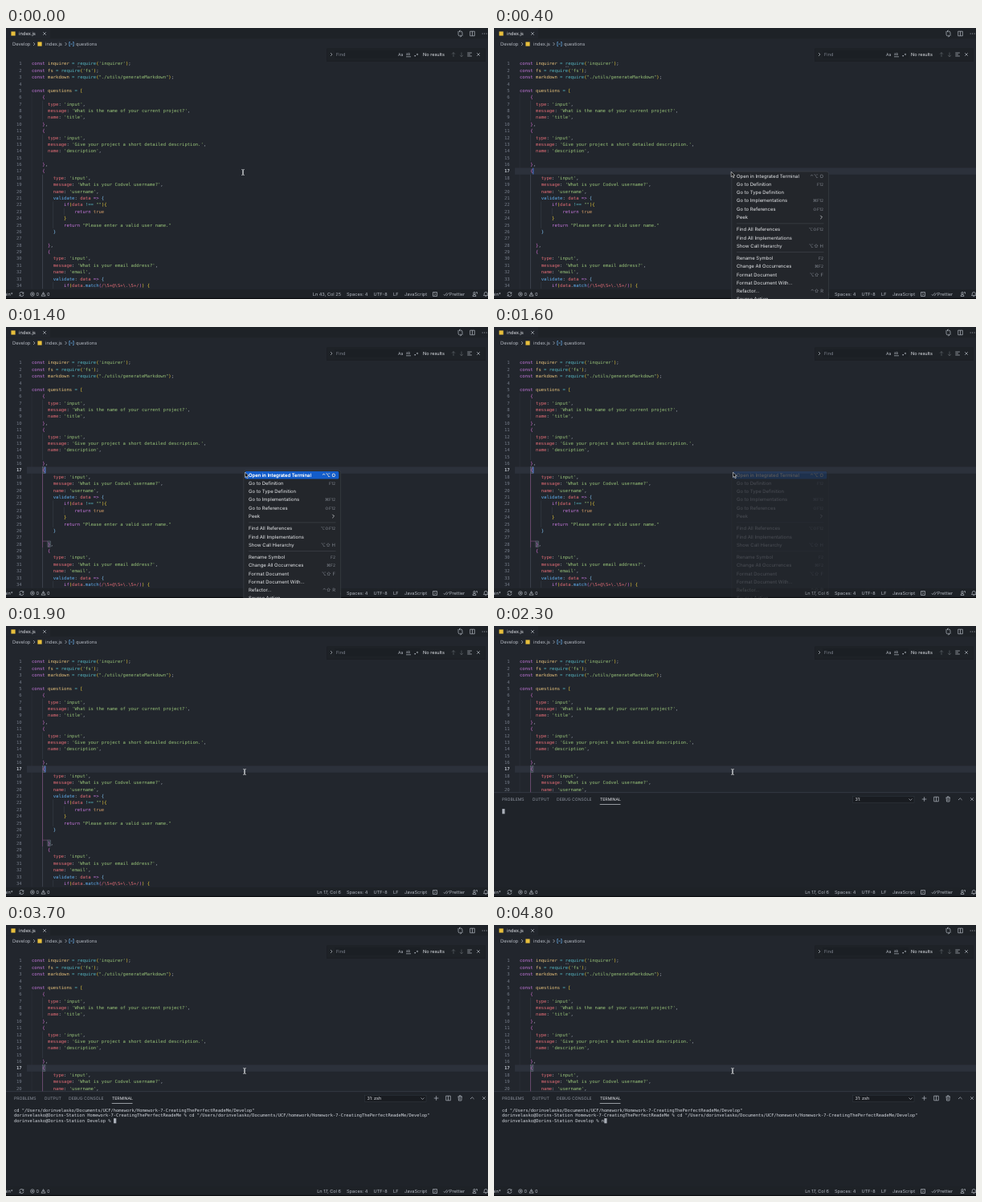
An HTML page for the animation above (5 s loop, 600 by 338 pixels).

```html
<!DOCTYPE html>
<html lang="en">
<head>
<meta charset="utf-8">
<title>Editor and terminal</title>
<style>
  html, body { margin: 0; width: 100%; height: 100%; overflow: hidden; background: #22262d; }
  svg { display: block; width: 600px; height: 338px; }
  text { white-space: pre; text-rendering: geometricPrecision; font-family: Inter, "DejaVu Sans", sans-serif; }
  .mono { font-family: "DejaVu Sans Mono", monospace; }
  .icon { fill: none; stroke: #b4b9c2; stroke-width: .7; }
</style>
</head>
<body>
<svg id="stage" viewBox="0 0 600 338"></svg>
<script>
const LOOP = 5000, STEP = 100;
const CODE_SIZE = 5.563, CHAR = CODE_SIZE * .602, CODE_X = 32, ROW = 8.38;
const rowY = n => 44.5 + (n - 1) * ROW;
const colX = n => CODE_X + n * CHAR;

const text = (x, y, s, size = 5.6, fill = '#b4b9c2', extra = '') =>
  `<text x="${x}" y="${y}" font-size="${size}" fill="${fill}" ${extra}>${s}</text>`;
const mono = (x, y, s, size, fill, extra = '') => text(x, y, s, size, fill, 'class="mono" ' + extra);
const rect = (x, y, w, h, fill, extra = '') =>
  `<rect x="${x}" y="${y}" width="${w}" height="${h}" fill="${fill}" ${extra}/>`;
const icon = (d, extra = '') => `<path class="icon" d="${d}" ${extra}/>`;
const cross = (x, y, r = 1.8) => icon(`M${x - r} ${y - r}l${2 * r} ${2 * r}m0 ${-2 * r}l${-2 * r} ${2 * r}`);
const split = (x, y) => icon(`M${x - 2.8} ${y - 2.8}h5.6v5.6h-5.6zm2.8 0v5.6`);
const chevron = (x, y) => icon(`M${x - 1} ${y - 2}l2 2l-2 2`);
const during = (from, to, body) => `<g data-from="${from}" data-to="${to}">${body}</g>`;

const code = String.raw`const inquirer = require('inquirer');
const fs = require('fs');
const markdown = require("./utils/generateMarkdown");

const questions = [
    {
      type: 'input',
      message: 'What is the name of your current project?',
      name: 'title',
    },
    {
      type: 'input',
      message: 'Give your project a short detailed description.',
      name: 'description',

    },
    {
        type: 'input',
        message: 'What is your Codvel username?',
        name: 'username',
        validate: data => {
            if(data !== ""){
                return true
            }
            return "Please enter a valid user name."
        }

      },
      {
        type: 'input',
        message: 'What is your email address?',
        name: 'email',
        validate: data => {
            if(data.match(/\S+@\S+\.\S+/)) {`.split('\n');

const tokenColors = [
  [/'[^']*'|"[^"]*"/, '#98c379'],
  [/\/\\S.*\//, '#e06c75'],
  [/\b(?:const|if|return)\b|=>/, '#c678dd'],
  [/\btrue\b/, '#d19a66'],
  [/\brequire\b|!==|=/, '#56b6c2'],
  [/\b(?:validate|match)\b/, '#61afef'],
  [/\b(?:type|message|name|data)\b/, '#e06c75'],
  [/\b(?:inquirer|fs|markdown|questions)\b/, '#e5c07b'],
  [/[\[{(\]})]/, null],
];
const tokenPattern = new RegExp(tokenColors.map(([r]) => `(${r.source})`).join('|'), 'g');
const bracketColors = ['#f0cf3c', '#d070d0', '#80c4f4'];
let depth = 0;

function highlight(line) {
  return line.replace(tokenPattern, (token, ...groups) => {
    let color = tokenColors[groups.findIndex(g => g === token)][1];
    if (!color) color = bracketColors[('[{('.includes(token) ? depth++ : --depth) % 3];
    return `<tspan fill="${color}">${token}</tspan>`;
  });
}

function guide(col, first, last, color = '#3a3f49') {
  return rect(colX(col) - .3, rowY(first) - ROW / 2, .6, (last - first + 1) * ROW, color);
}

function editor() {
  const y = rowY(17);
  const box = col => (n => rect(colX(col) - .2, rowY(n) - 3.8, CHAR + .4, 7.6, '#515a6b', 'fill-opacity=".5" stroke="#7b8290" stroke-width=".4"'));
  return during(300, LOOP, rect(26, y - 4.2, 574, ROW, '#2c313b')) +
    guide(0, 6, 34, '#2e333c') + guide(4, 7, 9) + guide(4, 12, 15) + guide(4, 18, 34, '#4d5360') +
    guide(8, 22, 25) + guide(8, 34, 34) + guide(12, 23, 23) +
    during(700, LOOP, guide(4, 18, 28, '#865084') +
      rect(colX(4), rowY(28) - 4, CHAR * 2, .6, '#865084') + box(4)(17) + box(6)(28)) +
    code.map((line, i) => {
      const base = rowY(i + 1) + 1.9;
      return mono(19.7, base, i + 1, CODE_SIZE, '#737a87', 'text-anchor="end"') +
        mono(CODE_X, base, highlight(line), CODE_SIZE, '#abb2bf');
    }).join('') +
    during(300, LOOP, mono(19.7, y + 1.9, 17, CODE_SIZE, '#d5d9e0', 'text-anchor="end"')) +
    during(300, 2000, rect(colX(5) - .3, y - 3.9, .8, 7.8, '#528bff')) +
    [0, 1.6, 3.2].map(d => rect(89 + d, 47.8, .7, .7, '#a5abb5')).join('');
}

function header() {
  const file = (x, y) => rect(x - 2.6, y - 2.6, 5.2, 5.2, '#e8bf3c');
  return rect(0, 0, 600, 13.3, '#1e2227') + rect(0, 0, 55, 13.3, '#22262d') +
    file(9, 7) + text(16, 9, 'index.js', 5.8, '#dfe2e7') + cross(48, 7) +
    icon('M563 4v4q0 2 2 2h2m-1.3-1.3l1.3 1.3l-1.3 1.3M568 10v-4q0-2-2-2h-2m1.3-1.3l-1.3 1.3l1.3 1.3') +
    split(580.5, 7) + [592.7, 595.2, 597.7].map(x => rect(x, 6.6, .9, .9, '#c4c8cf')).join('') +
    text(8, 22, 'Develop', 5.8) + chevron(35, 20) + file(42, 20) + text(49, 22, 'index.js', 5.8) +
    chevron(74.5, 20) + icon('M80 17.5h-1.2v5h1.2M83 17.5h1.2v5h-1.2M80.2 20h2.6', 'style="stroke:#6cb2ec"') +
    text(87, 22, 'questions', 5.7);
}

function findBar() {
  return rect(399, 25.5, 198, 16.5, '#14171b', 'opacity=".45"') +
    rect(400, 25, 196.5, 15.8, '#1e2227') + chevron(405, 33) +
    rect(409, 28, 107, 10, '#1b1f24') + text(411, 35.1, 'Find', 5.6, '#7b818c') +
    text(488, 34.9, 'Aa', 5.2) + text(498, 34.2, 'ab', 4.6) + icon('M498 35.8h6') +
    rect(508.5, 34, 1.4, 1.4, '#b4b9c2') + text(510.5, 35.8, '*', 6) +
    text(519, 35.1, 'No results', 5.6, '#e0e3e8') +
    icon('M557 36v-5.4m-2 2l2-2l2 2M567 30.4v5.4m-2-2l2 2l2-2', 'opacity=".4"') +
    icon('M574.3 31h5.6m-5.6 2h3.6m-3.6 2h5.6') + cross(588, 33);
}

function panel() {
  const path = '"/Users/dorinvelasko/Documents/UCF/homework/Homework-7-CreatingThePerfectReadeMe/Develop"';
  const user = 'dorinvelasko@Dorins-Station ';
  const size = 5.412, cell = size * .602;
  const line = (n, s) => mono(10, 232.8 + n * 6.5, s, size, '#d3d7de');
  const block = (chars, n) => rect(10.2 + chars * cell, 228.1 + n * 6.5, cell, 6.2, '#a9aeb7');
  const prompt = user + 'Develop % ';
  const end = prompt.length;
  return rect(0, 207.6, 600, 118.4, '#1f2329') + rect(0, 207.4, 600, .7, '#3b414c') +
    [[10, 'PROBLEMS'], [47.5, 'OUTPUT'], [78, 'DEBUG CONSOLE'], [132, 'TERMINAL']].map(([x, s]) =>
      text(x, 218.3, s, 5.1, s === 'TERMINAL' ? '#e6e8ec' : '#8d939e')).join('') +
    rect(131.7, 222, 25.8, .7, '#c9cdd4') +
    rect(446.5, 212.2, 76.5, 8, '#191c21', 'stroke="#343a44" stroke-width=".5"') +
    during(2000, 2800, text(449.5, 218.2, '31:', 5.4, '#e0e3e8')) +
    during(2800, LOOP, text(449.5, 218.2, '31: zsh', 5.4, '#e0e3e8')) +
    icon('M516.5 215.5l2 2l2-2M532.8 216h5.6m-2.8-2.8v5.6') + split(550.5, 216) +
    icon('M562.5 214h5.4m-3.6 0v-1.2h1.8v1.2m-3 0l.4 5h3.4l.4-5m-2.3 1v3') +
    icon('M578 217l2.3-2.2l2.3 2.2') + cross(595, 216) +
    during(2000, 3200, block(0, 0)) +
    during(3200, LOOP, line(0, 'cd ' + path)) +
    during(3200, 3400, block(0, 1)) +
    during(3400, LOOP, line(1, user + 'Homework-7-CreatingThePerfectReadeMe % cd ' + path) + line(2, prompt)) +
    during(3400, 4600, block(end, 2)) +
    during(4600, LOOP, line(2, ' '.repeat(end) + 'n') + block(end + 1, 2));
}

function statusBar() {
  const position = s => text(417, 333.9, s, 5.6, '#b4b9c2', 'text-anchor="end"');
  return rect(0, 326, 600, 12, '#1e2227') + rect(0, 336.8, 600, 1.2, '#0b0c0f') +
    text(8.5, 333.9, 'main*', 5.6, '#b4b9c2', 'text-anchor="end"') +
    icon('M16.8 331.5a2.5 2.5 0 0 1 4.8-.6m.2-1.5v1.8h-1.8M22 332.5a2.5 2.5 0 0 1-4.8.6m-.2 1.5v-1.8h1.8') +
    icon('M30.6 332a2.3 2.3 0 1 0 4.6 0a2.3 2.3 0 1 0-4.6 0M32 331l1.8 1.8m0-1.8l-1.8 1.8') +
    text(37.5, 333.9, '0') + icon('M44 334.2l2.5-4.6l2.5 4.6zm2.5-3v1.6') + text(51, 333.9, '0') +
    during(0, 300, position('Ln 43, Col 25')) + during(300, LOOP, position('Ln 17, Col 6')) +
    [[424, 'Spaces: 4'], [457.5, 'UTF-8'], [482, 'LF'], [496, 'JavaScript'], [552, 'Prettier']]
      .map(([x, s]) => text(x, 333.9, s)).join('') +
    icon('M531.5 329.5h5v5h-5zm1.7 1.2l1.6 1.3l-1.6 1.3') +
    icon('M544.8 332.2l1.4 1.5l2.6-3.4m-.8 3l.6.5l2.6-3.4') +
    icon('M581 334.5q0-2.3 2-2.3t2 2.3zm.7-3.8a1.3 1.3 0 1 0 2.6 0a1.3 1.3 0 1 0-2.6 0M585 329.6h1.5v2') +
    icon('M594.5 333.6l.8-1.2v-1a2 2 0 0 1 4 0v1l.8 1.2zm2 1h1.6');
}

function menu() {
  const groups = [
    [184.6, 'Open in Integrated Terminal|⌃⌥ O', 'Go to Definition|F12', 'Go to Type Definition|',
      'Go to Implementations|⌘F12', 'Go to References|⇧F12', 'Peek|'],
    [251.2, 'Find All References|⌥⇧F12', 'Find All Implementations|', 'Show Call Hierarchy|⌥⇧ H'],
    [287, 'Rename Symbol|F2', 'Change All Occurrences|⌘F2', 'Format Document|⌥⇧ F',
      'Format Document With...|', 'Refactor...|⌃⇧ R', 'Source Action...|'],
  ];
  const item = (y, label, keys, on) => text(302, y + 2.1, label, 5.95, on ? '#fff' : '#e4e6e9') +
    text(410, y + 2, keys, keys.includes('F') && !keys.includes(' ') ? 5 : 5.9, on ? '#fff' : '#7e838c', 'text-anchor="end"');
  return `<g id="menu">` +
    rect(295.8, 179, 120.8, 166, '#23262b', 'rx="2.5" stroke="#41454c" stroke-width=".6"') +
    during(900, 1800, rect(297.5, 179.9, 116.8, 9.6, '#135dcb', 'rx="1.5"')) +
    groups.map(([top, ...items]) => items.map((s, i) => item(top + i * 10.25, ...s.split('|'))).join('')).join('') +
    during(900, 1800, item(184.6, 'Open in Integrated Terminal', '⌃⌥ O', true)) +
    [243.6, 279.3].map(y => rect(302, y, 108.5, .6, '#42464d')).join('') +
    icon('M406.3 233.8l2.2 2.2l-2.2 2.2', 'style="stroke:#e4e6e9"') + '</g>';
}

const beam = (x, y) => `<path d="M${x - 1.7} ${y - 3.5}q1.7 0 1.7 1v5q0 1-1.7 1M${x + 1.7} ${y - 3.5}q-1.7 0-1.7 1v5q0 1 1.7 1" fill="none" stroke="#e3e5e8" stroke-width=".8"/>`;
const arrow = (x, y) => `<path d="M${x} ${y}v6.4l1.5-1.4l1.1 2.5l1.1-.5l-1.1-2.4h2z" fill="#08090a" stroke="#f0f0f0" stroke-width=".6"/>`;

const stage = document.getElementById('stage');
stage.innerHTML = rect(0, 0, 600, 338, '#22262d') + editor() + header() + findBar() +
  during(2000, LOOP, panel()) + statusBar() + menu() +
  during(0, 300, beam(295, 180)) + during(300, 700, arrow(295.2, 179.3)) +
  during(700, 1800, arrow(297.6, 181.2)) + during(1800, LOOP, beam(297, 182));

const timed = [...stage.querySelectorAll('[data-from]')];
const menuGroup = document.getElementById('menu');

function menuOpacity(t) {
  if (t < 300) return 0;
  return Math.max(0, Math.min(1, 1 - (t - 1400) / 250));
}

function draw(now) {
  const t = Math.floor((now % LOOP) / STEP) * STEP;
  for (const el of timed) {
    const { from, to } = el.dataset;
    el.style.display = t >= +from && t < +to ? '' : 'none';
  }
  menuGroup.style.opacity = menuOpacity(t);
  requestAnimationFrame(draw);
}
draw(performance.now());
</script>
</body>
</html>
```
